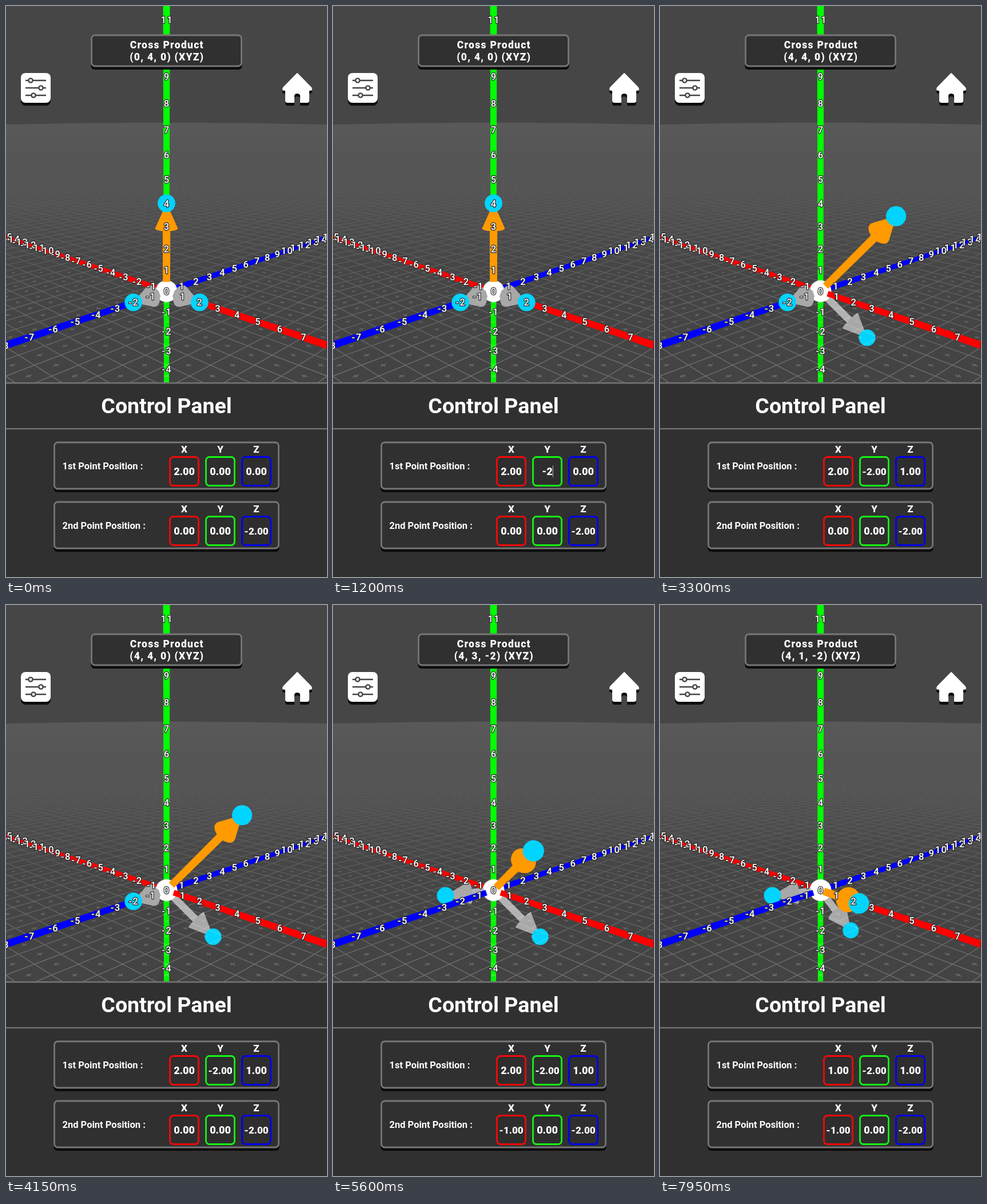
Write an HTML page with a canvas that moves like this. It is 561 px wide and 997 px high and loops after 8 s.

```html
<!DOCTYPE html>
<html lang="en">
<head>
<meta charset="utf-8">
<title>Cross Product</title>
<style>
  html, body { margin: 0; width: 100%; height: 100%; overflow: hidden; background: #303030; }
  canvas { display: block; }
</style>
</head>
<body>
<canvas id="stage" width="561" height="997"></canvas>
<script>
const ctx = document.getElementById('stage').getContext('2d');
const LOOP = 8000, UNIT = 38.5, PANEL_TOP = 657, AXIS_RADIUS = 0.128;
const RED = '#ff0000', GREEN = '#00ff00', BLUE = '#0000ff', CYAN = '#00d4ff', ORANGE = '#ff9a00';
const FIELD_COLORS = ['#f80808', '#16f516', '#0000f0'];

// Each edit selects a field, types into it, then commits the value.
const START = [[2, 0, 0], [0, 0, -2]];
const EDITS = [
  { row: 0, col: 1, select: 150, keys: [[800, '-'], [1050, '-2']], commit: 1350, value: -2 },
  { row: 0, col: 2, select: 2200, keys: [[2550, '1']], commit: 2750, value: 1 },
  { row: 1, col: 0, select: 4200, keys: [[4600, '-'], [5000, '-1']], commit: 5300, value: -1 },
  { row: 0, col: 0, select: 6600, keys: [[6850, '1']], commit: 7150, value: 1 },
];

function stateAt(t) {
  const points = START.map(p => [...p]);
  let active = null;
  for (const e of EDITS) {
    if (t >= e.commit) points[e.row][e.col] = e.value;
    else if (t >= e.select) {
      const typed = e.keys.filter(k => t >= k[0]).pop();
      active = { row: e.row, col: e.col, text: typed && typed[1] };
    }
  }
  return { points, active };
}

// Vector and camera helpers
const cross = (a, b) => [a[1] * b[2] - a[2] * b[1], a[2] * b[0] - a[0] * b[2], a[0] * b[1] - a[1] * b[0]];
const scale = (v, k) => v.map(c => c * k);
const unit = v => scale(v, 1 / Math.hypot(...v));

function project([x, y, z]) {
  const w = 1 - 0.0293 * (x - z) - 0.0148 * y;
  return { x: 280.5 + 27.2 * (x + z) / w, y: 498 + (9.13 * (x - z) - 36.1 * y) / w, w };
}

function polygon(points, fill) {
  ctx.beginPath();
  points.forEach(p => ctx.lineTo(p.x, p.y));
  ctx.closePath();
  ctx.fillStyle = fill;
  ctx.fill();
}

function rod(from, to, radius, color) {
  const a = project(from), b = project(to);
  const len = Math.hypot(b.x - a.x, b.y - a.y) || 1;
  const nx = -(b.y - a.y) / len, ny = (b.x - a.x) / len;
  const side = (p, s) => ({ x: p.x + s * nx * radius * UNIT / p.w, y: p.y + s * ny * radius * UNIT / p.w });
  polygon([side(a, 1), side(b, 1), side(b, -1), side(a, -1)], color);
}
const axis = (from, to, color) => rod(from, to, AXIS_RADIUS, color);

function ball(center, radius, color) {
  const p = project(center);
  ctx.beginPath();
  ctx.arc(p.x, p.y, radius / p.w, 0, 7);
  ctx.fillStyle = color;
  ctx.fill();
}

function cone(base, tip, dir, radius, color) {
  const u = unit(cross(dir, Math.abs(dir[1]) > 0.9 ? [1, 0, 0] : [0, 1, 0])), v = cross(dir, u);
  const rim = Array.from({ length: 32 }, (_, i) => {
    const c = radius * Math.cos(i * Math.PI / 16), s = radius * Math.sin(i * Math.PI / 16);
    return project(base.map((b, k) => b + c * u[k] + s * v[k]));
  });
  const top = project(tip);
  polygon(rim, color);
  rim.forEach((p, i) => polygon([p, rim[(i + 2) % 32], top], color));
}

function arrow(tip, shaftColor, coneColor) {
  const dir = unit(tip), neck = scale(dir, Math.hypot(...tip) - 1.1);
  rod(scale(dir, 0.45), neck, 0.165, shaftColor);
  cone(neck, tip, dir, 0.49, coneColor);
  ball(tip, 14.5, CYAN);
}
const grayArrow = tip => arrow(tip, '#b2b2b2', '#a8a8a8');

function backdrop() {
  ctx.fillStyle = '#464646';
  ctx.fillRect(0, 0, 561, PANEL_TOP);
  const floor = ctx.createLinearGradient(0, 203, 0, PANEL_TOP);
  floor.addColorStop(0, '#595959');
  floor.addColorStop(0.25, '#525252');
  floor.addColorStop(0.55, '#464646');
  floor.addColorStop(1, '#434343');
  ctx.beginPath();
  ctx.moveTo(0, 207);
  ctx.quadraticCurveTo(280, 200, 561, 207);
  ctx.lineTo(561, PANEL_TOP);
  ctx.lineTo(0, PANEL_TOP);
  ctx.fillStyle = floor;
  ctx.fill();
}

function grid() {
  const fade = ctx.createLinearGradient(0, 270, 0, PANEL_TOP);
  fade.addColorStop(0, 'rgba(255,255,255,0)');
  fade.addColorStop(0.4, 'rgba(255,255,255,.1)');
  fade.addColorStop(1, 'rgba(255,255,255,.26)');
  ctx.strokeStyle = fade;
  ctx.lineWidth = 1.3;
  const segment = (a, b) => {
    const p = project(a), q = project(b);
    ctx.moveTo(p.x, p.y);
    ctx.lineTo(q.x, q.y);
  };
  ctx.beginPath();
  for (let k = -60; k <= 60; k++) {
    segment([k, 0, Math.max(-60, k - 27)], [k, 0, 60]);
    segment([-60, 0, k], [Math.min(60, k + 27), 0, k]);
  }
  // Small marks at the cell centres
  for (let x = -9.5; x < 16; x++) for (let z = -15.5; z < 10; z++) {
    if (x - z < -4 || x - z > 18) continue;
    segment([x - 0.1, 0, z], [x + 0.1, 0, z]);
    segment([x, 0, z - 0.1], [x, 0, z + 0.1]);
  }
  ctx.stroke();
}

function text(str, x, y, font, { align = 'center', spacing = 0, color = '#fff', outline = 0 } = {}) {
  ctx.font = font + ' Roboto, sans-serif';
  ctx.textAlign = align;
  ctx.textBaseline = 'alphabetic';
  ctx.letterSpacing = spacing + 'px';
  if (outline) {
    ctx.strokeStyle = '#2a2a2a';
    ctx.lineWidth = outline;
    ctx.lineJoin = 'round';
    ctx.strokeText(str, x, y);
  }
  ctx.fillStyle = color;
  ctx.fillText(str, x, y);
}

function axisLabels() {
  const label = (n, pos) => {
    const p = project(pos);
    text(String(n), p.x + 0.7, p.y + 6, '500 16.5px', { spacing: 1.4, outline: 2.4 });
  };
  for (let n = -15; n <= 15; n++) {
    if (n < 9) label(n, [n, 0, 0]);
    if (n > -9 && n) label(n, [0, 0, n]);
    if (n > -5 && n < 12 && n) label(n, [0, n, 0]);
  }
}

function scene([a, b]) {
  ctx.save();
  ctx.beginPath();
  ctx.rect(0, 0, 561, PANEL_TOP);
  ctx.clip();
  backdrop();
  // Below the translucent floor
  axis([0, 0, 0], [0, -6, 0], '#00f500');
  if (a[1] < 0) grayArrow(a);
  grid();
  // Behind the origin
  axis([0, 0, 0], [-17, 0, 0], RED);
  axis([0, 0, 0], [0, 0, 17], BLUE);
  axis([0, 0, 0], [0, 13, 0], GREEN);
  ball([0, 0, 0], 19, '#fff');
  if (b[0] < 0) grayArrow(b);
  // In front of the origin
  axis([0.45, 0, 0], [10, 0, 0], RED);
  axis([0, 0, -0.45], [0, 0, -10], BLUE);
  if (a[1] >= 0) grayArrow(a);
  if (b[0] >= 0) grayArrow(b);
  arrow(cross(a, b), ORANGE, ORANGE);
  axisLabels();
  ctx.restore();
}

function box(x, y, w, h, radius, fill, border, lineWidth = 3) {
  ctx.beginPath();
  ctx.roundRect(x, y, w, h, radius);
  ctx.fillStyle = fill;
  ctx.fill();
  if (!border) return;
  ctx.strokeStyle = border;
  ctx.lineWidth = lineWidth;
  ctx.stroke();
}

function card(x, y, w, h) {
  box(x - 1, y + 4, w + 2, h + 2, 6, '#0c0c0c');
  box(x, y, w, h, 6, '#303030', '#767676', 2.8);
}

function settingsIcon() {
  box(26, 123, 52, 51, 8, '#0c0c0c');
  box(26, 117, 52, 52, 8, '#fff');
  ctx.strokeStyle = '#444';
  ctx.fillStyle = '#fff';
  ctx.lineWidth = 2.4;
  [[43, 130], [61, 143], [48, 156]].forEach(([x, y]) => {
    ctx.beginPath();
    ctx.moveTo(34, y);
    ctx.lineTo(70, y);
    ctx.stroke();
    ctx.beginPath();
    ctx.arc(x, y, 3.6, 0, 7);
    ctx.fill();
    ctx.stroke();
  });
}

function homeIcon() {
  const house = new Path2D('M509 118L533 142.5Q536 147 531 147H529V165Q529 168 526 168H515V157Q515 152 509 152Q503 152 503 157V168H492Q489 168 489 165V147H487Q482 147 485 142.5Z');
  ctx.lineJoin = 'round';
  ctx.lineWidth = 2;
  for (const [dy, color] of [[5, '#0c0c0c'], [0, '#fff']]) {
    ctx.save();
    ctx.translate(0, dy);
    ctx.fillStyle = ctx.strokeStyle = color;
    ctx.fill(house);
    ctx.stroke(house);
    ctx.restore();
  }
}

function field(x, y, color, value, active) {
  box(x, y, 50, 50, 6, '#2e2e2e', color, 2.8);
  const typed = active && active.text;
  const str = typed || value.toFixed(2);
  const font = `900 ${str.length > 4 ? 17 : 18}px`;
  const cx = x + 25;
  ctx.font = font + ' Roboto, sans-serif';
  ctx.letterSpacing = '0px';
  const half = ctx.measureText(str).width / 2;
  if (active && !typed) {
    ctx.fillStyle = 'rgba(168,206,255,.75)';
    ctx.fillRect(cx - half, y + 14, half * 2, 21);
  }
  text(str, cx, y + 31.5, font);
  if (typed) {
    ctx.fillStyle = '#aaa';
    ctx.fillRect(cx + half, y + 15, 1.2, 20);
  }
}

function controls({ points, active }) {
  ctx.fillStyle = '#303030';
  ctx.fillRect(0, PANEL_TOP, 561, 997 - PANEL_TOP);
  ctx.fillStyle = '#727272';
  ctx.fillRect(0, 657, 561, 2.6);
  ctx.fillRect(0, 737, 561, 2.4);
  text('Control Panel', 280.5, 711, '700 37.5px');
  ['1st', '2nd'].forEach((name, row) => {
    const y = 762 + row * 104;
    card(84.5, y, 392, 81);
    text(name + ' Point Position :', 98.5, y + 46.5, '700 16.5px', { align: 'left' });
    points[row].forEach((value, col) => {
      const x = 286.5 + col * 63;
      text('XYZ'[col], x + 25, y + 18, '900 17px');
      field(x, y + 25.5, FIELD_COLORS[col], value, active && active.row === row && active.col === col ? active : null);
    });
  });
}

function header([a, b]) {
  card(149.5, 51, 262, 54);
  const values = cross(a, b).map(n => n + 0).join(', ');
  const style = { spacing: 1.3 };
  text('Cross Product', 281.3, 74, '900 17.5px', style);
  text(`(${values}) (XYZ)`, 281.3, 95, '900 17.5px', style);
}

function frame(now) {
  const state = stateAt(now % LOOP);
  scene(state.points);
  header(state.points);
  settingsIcon();
  homeIcon();
  controls(state);
  requestAnimationFrame(frame);
}
requestAnimationFrame(frame);
</script>
</body>
</html>
```
